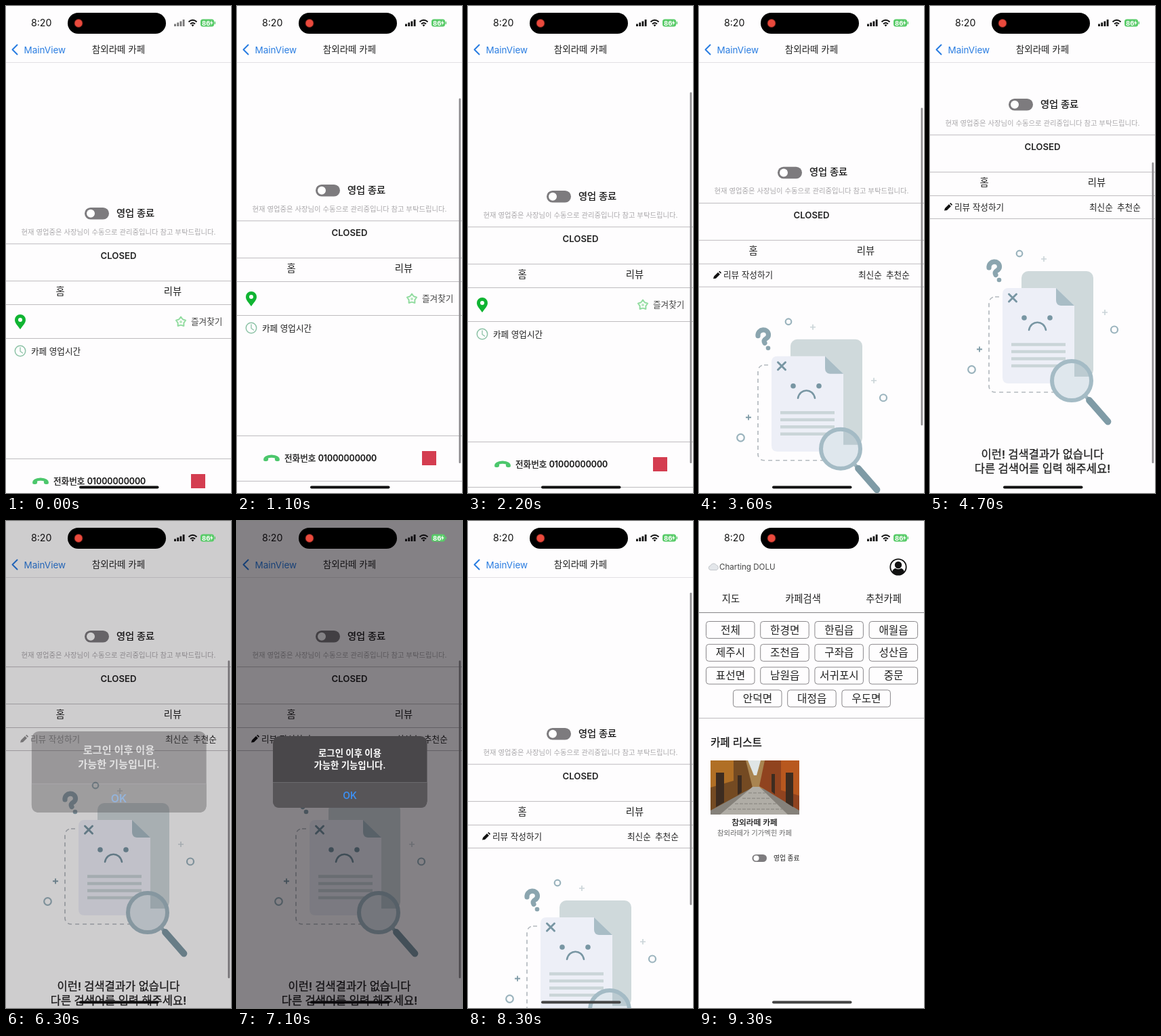
Animation of 332 by 720 pixels, one loop 9400 ms. Source, as an HTML page:

```html
<!DOCTYPE html>
<html lang="ko">
<head>
<meta charset="utf-8">
<style>
  html, body { margin: 0; width: 100%; height: 100%; overflow: hidden; background: #fefdfe; }
  svg { display: block; }
  text { font-family: Inter, 'Noto Sans CJK KR', 'Noto Sans CJK', sans-serif; fill: #222; white-space: pre; }
  .mid { text-anchor: middle; }
  .m { font-weight: 500; fill: #111; }
  .m, .m text { stroke: #111; stroke-width: .25; }
  .thin { font-weight: 300; }
  .rule { stroke: #bebcbf; fill: none; }
  .line { fill: none; stroke-linecap: round; stroke-linejoin: round; }
</style>
</head>
<body>
<svg width="332" height="720" viewBox="0 0 332 720">
  <g id="list">
    <rect width="332" height="720" fill="#fefdfe"/>
    <path d="M17 72.500a3.300 3.300 0 0 1 0-6.500 4.800 4.800 0 0 1 8.500-1 4 4 0 0 1 .5 7.500z" fill="#e3e6ea" stroke="#b9bdc2" stroke-width=".8"/>
    <text x="30" y="72" font-size="11.600" style="fill:#444">Charting DOLU</text>
    <circle cx="294" cy="68" r="11.700" fill="#fff" stroke="#111" stroke-width="1.800"/>
    <circle cx="294" cy="65" r="5.200" fill="#111"/>
    <path d="M285 75.500q1-5 5-5.500 4 2.500 8 0 4 .5 5 5.500a12 12 0 0 1-18 0z" fill="#111"/>
    <g class="mid thin" font-size="14.300">
      <text x="47" y="120">지도</text>
      <text x="153.500" y="120">카페검색</text>
      <text x="272.500" y="120">추천카페</text>
    </g>
    <path d="M0 135.500H332" stroke="#858386"/>
    <path class="rule" d="M0 291.500H332"/>
    <g id="regions" class="mid thin" font-size="15.700"></g>
    <text class="m" x="17" y="332.500" font-size="15.600">카페 리스트</text>
    <svg x="17" y="354" width="131" height="80" viewBox="0 0 131 80">
      <path d="M0 0H131V80H0z" fill="#85817a"/>
      <path d="M46 0H86V42H46z" fill="#a98450"/>
      <path d="M55 0H74L68 22H64z" fill="#dfe5e6"/>
      <path d="M0 0H52L62 40 0 74z" fill="#744a22"/>
      <path d="M0 0H34V30L0 40z" fill="#b06f25"/>
      <path d="M131 0H80L72 38 131 74z" fill="#90431f"/>
      <path d="M131 0H104V44L131 52z" fill="#b8581f"/>
      <path d="M8 18H20V62L8 69zM40 22H46V47L40 51zM111 18H122V69L111 62zM90 20H95V50L90 46z" fill="#3d2c20"/>
      <path d="M62 39H72L114 80H14z" fill="#b0ada6"/>
      <path d="M56 48H81M47 56H89M36 64H98M26 72H106" stroke="#85827c" stroke-dasharray="5 2"/>
    </svg>
    <text class="mid m" x="82" y="450" font-size="11.700">참외라떼 카페</text>
    <text class="mid" x="82" y="464.500" font-size="10.300" style="fill:#666">참외라떼가 기가멕힌 카페</text>
    <rect x="78.500" y="493" width="21.500" height="11" rx="5.500" fill="#7d7b7e"/>
    <circle cx="84.500" cy="498.500" r="4" fill="#fff"/>
    <text x="110" y="502" font-size="9.700">영업 종료</text>
  </g>

  <g id="detail">
    <rect width="332" height="720" fill="#fefdfe"/>
    <g id="content">
      <rect x="116" y="298" width="36" height="17.500" rx="8.700" fill="#7d7b7e"/>
      <circle cx="125" cy="306.700" r="6" fill="#fff"/>
      <text class="m" x="163" y="310.500" font-size="14.200">영업 종료</text>
      <text class="mid" x="166" y="337.500" font-size="10.350" style="fill:#aaa8ab">현재 영업중은 사장님이 수동으로 관리중입니다 참고 부탁드립니다.</text>
      <text class="mid" x="166" y="374" font-size="13.200" font-weight="600">CLOSED</text>
      <g class="mid thin" font-size="14.300">
        <text x="80" y="427">홈</text>
        <text x="246" y="427">리뷰</text>
      </g>
      <path class="rule" d="M0 351.700H332M0 406.600H332M0 441.500H332"/>

      <g id="home" font-size="12.600">
        <path class="rule" d="M0 491.500H332M0 669.500H332M0 736.500H332"/>
        <path d="M21 478C17 472 13 469 13 464a8 8 0 0 1 16 0C29 469 25 472 21 478z" fill="#10b432"/>
        <circle cx="21" cy="464" r="3" fill="#fff"/>
        <path id="star" class="line" stroke="#92dca0" stroke-width="2"/>
        <circle cx="258" cy="467" r="2" fill="#b5e8bd"/>
        <text x="273" y="471" style="fill:#444">즐겨찾기</text>
        <circle cx="21" cy="510" r="7.700" fill="none" stroke="#8cc2a6" stroke-width="1.500"/>
        <path class="line" d="M21 505V510.500L24.500 513" stroke="#8cc2a6" stroke-width="1.300"/>
        <text x="37" y="514.500">카페 영업시간</text>
        <path d="M39 705Q39 698 51 697.500 63 698 63 705 63 708 57 706.500 55.500 706 56 702.500 51 701 46 702.500 46.500 706 45 706.500 39 708 39 705z" fill="#4cc76c"/>
        <text class="m" x="70" y="707">전화번호 01000000000</text>
        <rect x="273" y="692" width="21" height="21" fill="#d43d50"/>
      </g>

      <g id="review">
        <path class="rule" d="M0 475.500H332"/>
        <g id="write">
          <path d="M21 463.500L22 460 28 454 31 457 25 463zM29 453L30.500 452 33 454.500 32 456z" fill="#111"/>
          <text x="36" y="462.500" font-size="12.600">리뷰 작성하기</text>
        </g>
        <text x="235" y="462.500" font-size="12.600">최신순</text>
        <text x="276" y="462.500" font-size="12.600">추천순</text>
        <g transform="translate(0 161)">
          <rect x="135" y="392" width="106" height="156" rx="10" fill="#cfd9db"/>
          <rect x="87" y="430" width="108" height="141" rx="9" fill="none" stroke="#b4babf" stroke-width="1.700" stroke-dasharray="6 5"/>
          <path d="M116 417H186L213 443V549Q213 558 204 558H116Q107 558 107 549V426Q107 417 116 417z" fill="#edeff7"/>
          <path d="M186 417L213 443H193Q186 442 186 435z" fill="#a9bdc6"/>
          <g class="line" stroke="#7896a3">
            <path d="M116.500 426L127.500 437M127.500 426L116.500 437" stroke-width="3"/>
            <path d="M146 479C149 464 168 464 171 479" stroke-width="2.600"/>
            <path d="M87 387C86 376 102.500 375 102.500 385.500 102.500 393 93 390 97 397.500" stroke-width="7.200" stroke="#8ba5af"/>
          </g>
          <circle cx="139" cy="461" r="3.800" fill="#7896a3"/>
          <circle cx="177" cy="461" r="3.800" fill="#7896a3"/>
          <circle cx="102" cy="405" r="3.300" fill="#8ba5af"/>
          <path d="M120 500.500H200M120 511H200M120 521.500H200M120 532H200" stroke="#cad5d8" stroke-width="4.500"/>
          <path class="line" d="M228 575L235 583" stroke="#9fb5be" stroke-width="5"/>
          <path class="line" d="M235 583L262.500 614.500" stroke="#7f9ba6" stroke-width="9.800"/>
          <circle cx="209" cy="554" r="29" fill="#dfe7ed"/>
          <path d="M213 528A28 28 0 0 1 236 548H213z" fill="#bccbd1"/>
          <circle cx="209" cy="554" r="29" fill="none" stroke="#a4bbc5" stroke-width="6"/>
          <g fill="none" stroke="#9ab3bd" stroke-width="2.200">
            <circle cx="132" cy="366" r="4.300"/>
            <circle cx="272" cy="478.500" r="5"/>
            <circle cx="61.500" cy="537.500" r="5.300"/>
          </g>
          <path d="M164 374H172M168 370V378M254 453H262M258 449V457" stroke="#ccd5d9" stroke-width="1.700"/>
          <path d="M69 507.500H77M73 503.500V511.500" stroke="#7f9ba7" stroke-width="1.800"/>
          <g class="mid m" font-size="16.500">
            <text x="166" y="669">이런! 검색결과가 없습니다</text>
            <text x="166" y="690">다른 검색어를 입력 해주세요!</text>
          </g>
        </g>
      </g>
    </g>
    <rect id="bar" x="327.500" width="2.700" rx="1.300" fill="#8e8c8f"/>
    <rect width="332" height="83" fill="#fefdfe"/>
    <path d="M0 83.500H332" stroke="#e2e0e3"/>
    <path class="line" d="M16.500 57.500L9.500 64.500 16.500 71.500" stroke="#2a7de1" stroke-width="2"/>
    <text x="26.500" y="69.500" font-size="13.500" style="fill:#2a7de1">MainView</text>
    <text class="mid" x="166" y="69" font-size="13.500">참외라떼 카페</text>
  </g>

  <text x="37" y="30" font-size="14.200" style="fill:#111">8:20</text>
  <g id="signal">
    <path d="M249.500 30V26.500M253.700 30V24.500M257.900 30V22.500M262.100 30V20" stroke="currentColor" stroke-width="2.800"/>
    <path d="M269.500 23.500Q275.500 18 281.500 23.500M272 26.500Q275.500 23.500 279 26.500" fill="none" stroke="#111" stroke-width="2"/>
    <path d="M273.500 28Q275.500 26.500 277.500 28L275.500 30.500z" fill="#111"/>
  </g>
  <rect id="indicator" x="108" y="709.500" width="117.500" height="4" rx="2"/>

  <rect id="dim" width="332" height="720" fill="#060008"/>
  <rect x="287" y="19.500" width="20" height="11" rx="3.500" fill="#58cb68"/>
  <path d="M308.300 23V27" stroke="#58cb68" stroke-width="1.400"/>
  <text x="289" y="28.500" font-size="9.500" font-weight="700" style="fill:#fff">86</text>
  <path d="M303.700 21L301 25.500H303L302.300 29 305.500 24.300H303.500z" fill="#fff"/>
  <rect x="91" y="10" width="145" height="31" rx="15.500" fill="#000"/>
  <circle cx="107" cy="25.500" r="6" fill="#ea4a3d" stroke="#6b1d18"/>
  <g id="alert">
    <rect x="53" y="318" width="227.500" height="106" rx="10" fill="#49474a"/>
    <path d="M53 387H280.500V414Q280.500 424 270.500 424H63Q53 424 53 414z" fill="#575558"/>
    <path d="M53 386.500H280.500" stroke="#6b6a6d"/>
    <g class="mid" font-weight="600">
      <text x="166.500" y="347.500" font-size="13.400" style="fill:#fff">로그인 이후 이용</text>
      <text x="166.500" y="366" font-size="13.400" style="fill:#fff">가능한 기능입니다.</text>
      <text x="166.500" y="411" font-size="14" style="fill:#3d8ff0">OK</text>
    </g>
  </g>
</svg>
<script>
const LOOP = 9400, STEP = 100, VIEW = 637, TRACK = 570, TRACK_TOP = 106;
const $ = id => document.getElementById(id);
const clamp = (v, lo = 0, hi = 1) => Math.min(hi, Math.max(lo, v));
const easeOut = u => 1 - (1 - u) ** 2;
const phase = (t, start, length) => easeOut(clamp((t - start) / length));
const show = (id, on) => $(id).setAttribute('visibility', on ? 'inherit' : 'hidden');

// Scroll offset: [time, y], negative or past the limit while bouncing
const scrollKeys = [
  [0, 0], [600, 0], [1100, 34], [1500, 25], [3300, 25], [4200, 161], [4900, 161],
  [5400, 136], [7800, 136], [8200, -14], [8300, -8], [8500, 0]
];

function scrollAt(t) {
  const i = scrollKeys.findIndex(key => key[0] > t);
  if (i < 0) return scrollKeys.at(-1)[1];
  const [t0, y0] = scrollKeys[i - 1], [t1, y1] = scrollKeys[i];
  const u = (t - t0) / (t1 - t0);
  return y0 + (y1 - y0) * u * u * (3 - 2 * u);
}

const rows = ['전체 한경면 한림읍 애월읍', '제주시 조천읍 구좌읍 성산읍',
  '표선면 남원읍 서귀포시 중문', '안덕면 대정읍 우도면'];
$('regions').innerHTML = rows.map((row, r) => row.split(' ').map((name, c) => {
  const x = (r === 3 ? 50.5 : 10.5) + c * 80.2, y = 148.5 + r * 33.8;
  return `<rect x="${x}" y="${y}" width="71.5" height="25" rx="4" fill="none" stroke="#8a888b"/>
    <text x="${x + 36}" y="${y + 18}">${name}</text>`;
}).join('')).join('');

$('star').setAttribute('d', 'M' + Array.from({ length: 10 }, (_, i) => {
  const a = i * Math.PI / 5 - Math.PI / 2, r = i % 2 ? 4.6 : 7.4;
  return `${258 + r * Math.cos(a)} ${467 + r * Math.sin(a)}`;
}).join('L') + 'z');

function drawScroll(t, onReview) {
  const y = scrollAt(t), limit = onReview ? 136 : 25;
  const full = TRACK * VIEW / (VIEW + limit);
  const over = Math.max(0, -y, y - limit);
  const top = TRACK_TOP + (TRACK - full) * clamp(y / limit) + (y > limit ? over : 0);
  $('content').setAttribute('transform', `translate(0 ${-y})`);
  $('bar').setAttribute('y', top);
  $('bar').setAttribute('height', full - over);
  show('bar', t >= 600 && t < 2500 || t >= 3300);
}

function draw(t) {
  const onReview = t >= 2900;
  show('home', !onReview);
  show('review', onReview);
  drawScroll(t, onReview);
  $('write').setAttribute('opacity', t >= 6100 && t < 6500 ? 0.45 : 1);
  $('signal').setAttribute('color', t < 100 ? '#777' : '#111');
  $('indicator').setAttribute('fill', t < 8200 ? '#111' : '#444');

  const enter = phase(t, 6200, 450), leave = phase(t, 7500, 300);
  const scale = 1 + 0.22 * (1 - enter);
  $('dim').setAttribute('opacity', 0.49 * enter * (1 - leave));
  $('alert').setAttribute('opacity', enter * (1 - leave));
  $('alert').setAttribute('transform', `translate(166.7 371) scale(${scale}) translate(-166.7 -371)`);

  const pop = phase(t, 8550, 450);
  $('detail').setAttribute('transform', `translate(${332 * pop} 0)`);
  $('list').setAttribute('transform', `translate(${-100 * (1 - pop)} 0)`);
  show('detail', pop < 1);
}

function frame() {
  draw(Math.floor(performance.now() % LOOP / STEP) * STEP);
  requestAnimationFrame(frame);
}
frame();
</script>
</body>
</html>
```
